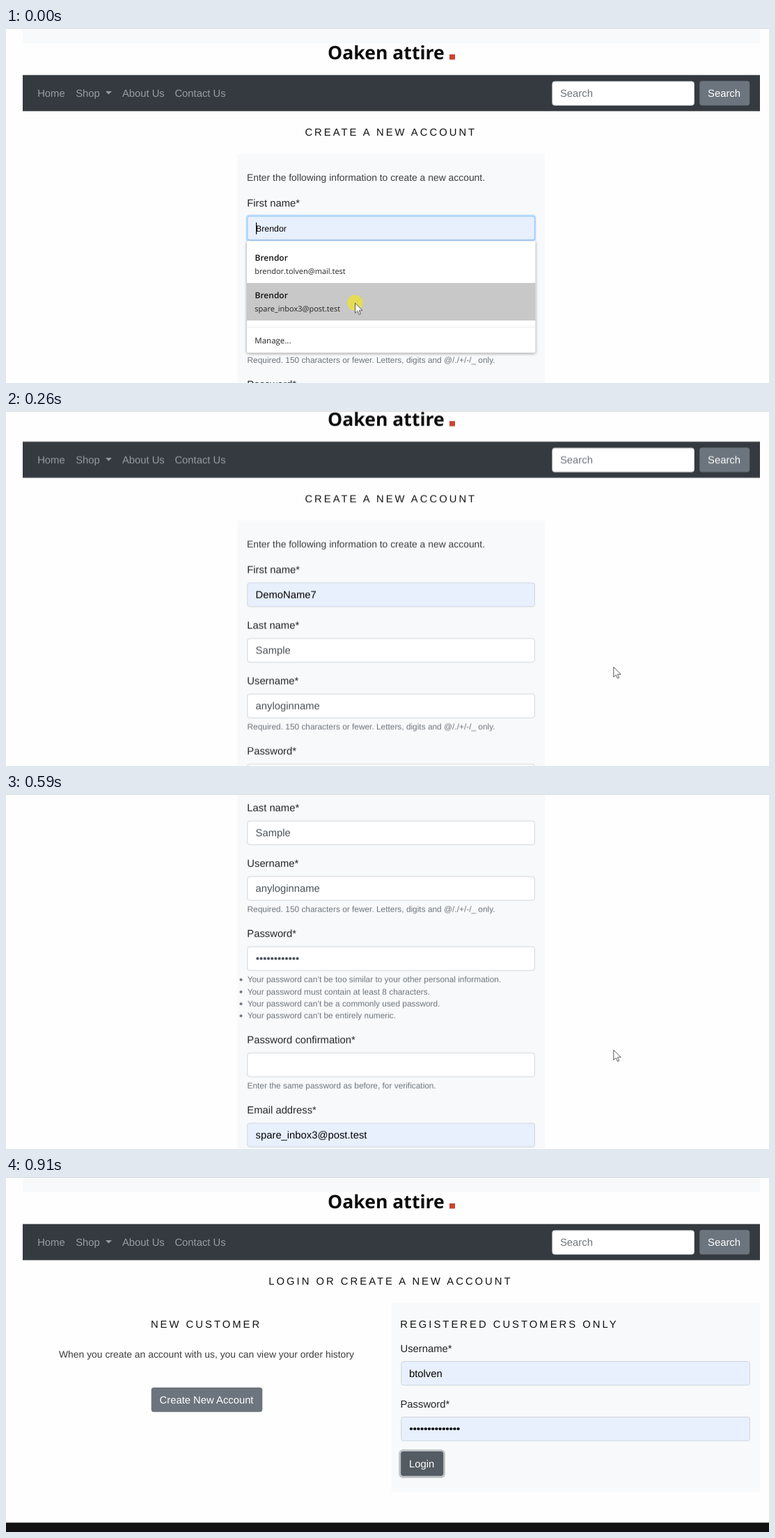
An HTML page that plays this animation: 1096 px wide and 511 px high, repeating every 0.99 s.

```html
<!DOCTYPE html>
<html lang="en">
<head>
<meta charset="utf-8">
<title>Create a new account</title>
<style>
  html, body { margin: 0; width: 100%; height: 100%; overflow: hidden; background: #fefefe; }
  svg { display: block; width: 1096px; height: 511px; }
  text { font: 14.8px "Liberation Sans", Arial, sans-serif; fill: #212529; text-rendering: geometricPrecision; white-space: pre; }
  .nav { fill: #999da0; }
  .light { fill: #fff; }
  .value { fill: #495057; }
  .filled { fill: #000; }
  .preview { font-size: 12.33px; fill: #000; }
  .hint { font-size: 11.88px; fill: #6c757d; }
  .placeholder { fill: #6c757d; }
  .intro { font-size: 13.9px; fill: #3d3d3d; }
  .title { fill: #111; letter-spacing: 3.02px; }
  .brand { font: 700 26.6px "Open Sans", sans-serif; fill: #0b0b0b; }
  .menu { font: 11px "Open Sans", sans-serif; fill: #222; }
  .menu.strong { font-size: 12px; font-weight: 600; fill: #111; }
  .menu.manage { font-size: 11.5px; }
  #popupBox { filter: drop-shadow(0 1px 2px rgba(0, 0, 0, .4)); }
</style>
</head>
<body>
<svg id="stage" viewBox="0 0 1096 511"></svg>
<script>
const DURATION = 990;
const AUTOFILL = '#e8f0fe';
const PANEL = '#f8f9fa';

const text = (x, y, content, kind = '') => `<text x="${x}" y="${y}" class="${kind}">${content}</text>`;

const box = (x, y, w, h, fill, extra = '') =>
  `<rect x="${x}" y="${y}" width="${w}" height="${h}" fill="${fill}" ${extra}/>`;

const input = (x, y, w, fill = '#fff', border = '#ced4da') =>
  box(x + .8, y + 1, w - 1.4, 34.2, fill, `rx="3.3" stroke="${border}" stroke-width=".95"`);

const button = (x, y, w, label, fill = '#6c757d') =>
  box(x, y, w, 35.3, fill, 'rx="3.7"') + text(x + 11.9, y + 22.8, label, 'light');

const dots = (x, y, count, fill) =>
  Array.from({ length: count }, (_, i) =>
    `<circle cx="${x + 5.2 * i}" cy="${y}" r="2.1" fill="${fill}"/>`).join('');

const field = (y, label, value = '', autofilled = false) =>
  text(346.3, y - 13, label) +
  input(346, y, 414, autofilled ? AUTOFILL : '#fff') +
  text(358.6, y + 23, value, autofilled ? 'filled' : 'value');

const header = () =>
  box(24, 0, 1059, 22, PANEL) +
  text(462, 45, 'Oaken attire', 'brand') +
  box(637, 38, 8, 7.5, '#c8442f') +
  box(24, 67.7, 1059, 52, '#343a40') +
  text(45.2, 98.5, 'Home', 'nav') +
  text(100.2, 98.5, 'Shop', 'nav') +
  '<path d="M143 91h9l-4.5 4.5z" fill="#999da0"/>' +
  text(166.9, 98.5, 'About Us', 'nav') +
  text(242.4, 98.5, 'Contact Us', 'nav') +
  input(784, 76, 205) +
  text(796, 98.7, 'Search', 'placeholder') +
  button(996.2, 76.2, 72, 'Search');

const passwordRules = [
  'Your password can’t be too similar to your other personal information.',
  'Your password must contain at least 8 characters.',
  'Your password can’t be a commonly used password.',
  'Your password can’t be entirely numeric.'
].map((rule, i) => {
  const y = 583.2 + 17.3 * i;
  return `<circle cx="337.5" cy="${y - 3.6}" r="2" fill="#6c757d"/>` + text(346.7, y, rule, 'hint');
}).join('');

const signupPage =
  header() +
  text(429.4, 155.4, 'CREATE A NEW ACCOUNT', 'title') +
  box(332.5, 181, 441.5, 900, PANEL) +
  text(346, 220, 'Enter the following information to create a new account.', 'intro') +
  field(270, 'First name*', 'DemoName7', true) +
  field(350, 'Last name*', 'Sample') +
  field(430, 'Username*', 'anyloginname') +
  text(346.5, 482, 'Required. 150 characters or fewer. Letters, digits and @/./+/-/_ only.', 'hint') +
  field(531, 'Password*') +
  dots(361.4, 549, 12, '#495057') +
  passwordRules +
  field(684, 'Password confirmation*') +
  text(346.5, 736, 'Enter the same password as before, for verification.', 'hint') +
  field(785, 'Email address*', 'spare_inbox3@post.test', true);

const suggestion = (y, name, email) =>
  text(357.5, y, name, 'menu strong') + text(357.3, y + 19.3, email, 'menu');

const popup =
  box(344.5, 268.5, 417, 39, '#bfdfff', 'rx="5"') +
  input(346, 270, 414, AUTOFILL, '#8cc3fb') +
  text(359, 293, 'Brendor', 'preview') +
  box(359, 280, 1.2, 17, '#000') +
  box(346, 306.5, 414.5, 161, '#fff', 'id="popupBox" rx="2"') +
  box(346, 367, 414.5, 54, '#c8c8c8') +
  box(346, 430, 414.5, 1, '#ececec') +
  suggestion(335, 'Brendor', 'brendor.tolven@mail.test') +
  suggestion(389, 'Brendor', 'spare_inbox3@post.test') +
  text(357.3, 454, 'Manage...', 'menu manage') +
  '<circle cx="501.3" cy="395.5" r="11.3" fill="#e4dc56"/>';

const loginPage =
  header() +
  text(377.2, 155.4, 'LOGIN OR CREATE A NEW ACCOUNT', 'title') +
  text(207.9, 217.4, 'NEW CUSTOMER', 'title') +
  text(76, 259.5, 'When you create an account with us, you can view your order history', 'intro') +
  button(208.7, 303, 159.6, 'Create New Account') +
  box(553.5, 181, 529.5, 272, PANEL) +
  text(566.2, 217.4, 'REGISTERED CUSTOMERS ONLY', 'title') +
  text(566.5, 251.5, 'Username*') +
  input(567, 264.5, 502, AUTOFILL) +
  text(579, 287.5, 'btolven', 'filled') +
  text(566.5, 331.5, 'Password*') +
  input(567, 344.5, 502, AUTOFILL) +
  dots(582, 362.5, 14, '#000') +
  box(564.3, 392.3, 66.5, 41, '#bcc0c4', 'rx="6"') +
  button(567.2, 395, 61, 'Login', '#545b62') +
  box(0, 497.5, 1096, 14, '#111');

const pointer =
  '<path d="M.5 .5V15L3.9 11.8L6.2 17L8.4 16L6.2 11H11Z" fill="#fff" stroke="#444" stroke-width=".9" stroke-linejoin="round"/>';

const group = (id, content) => `<g id="${id}">${content}</g>`;

document.getElementById('stage').innerHTML =
  group('signup', signupPage) +
  group('popup', popup) +
  group('login', loginPage) +
  group('pointer', pointer) +
  box(0, 0, 1096, 1, '#d6d7d8');

const rest = [872.3, 368];
const steps = [
  { at: 0, scroll: 0, pointer: [501, 395.5], popup: true },
  { at: 80, scroll: 0, pointer: [760, 380] },
  { at: 180, scroll: 0, pointer: rest },
  { at: 260, scroll: 23.6, pointer: rest },
  { at: 350, scroll: 150, pointer: rest },
  { at: 420, scroll: 259, pointer: rest },
  { at: 500, scroll: 299, pointer: rest },
  { at: 590, scroll: 312.2, pointer: rest },
  { at: 680, scroll: 300, pointer: rest },
  { at: 760, scroll: 205 },
  { at: 830, scroll: 93 },
  { at: 910, scroll: 0, login: true }
];

// Every pose holds until the next step.
function play(id, pose) {
  const frames = steps.map(step => ({ offset: step.at / DURATION, easing: 'step-end', ...pose(step) }));
  frames.push({ ...frames[frames.length - 1], offset: 1 });
  document.getElementById(id).animate(frames, { duration: DURATION, iterations: Infinity });
}

const shown = on => ({ opacity: on ? 1 : 0 });
const moved = (x, y) => ({ transform: `translate(${x}px, ${y}px)` });

play('signup', step => ({ ...moved(0, -step.scroll), ...shown(!step.login) }));
play('popup', step => shown(step.popup));
play('login', step => shown(step.login));
play('pointer', step => ({ ...moved(...(step.pointer || rest)), ...shown(step.pointer) }));
</script>
</body>
</html>
```
